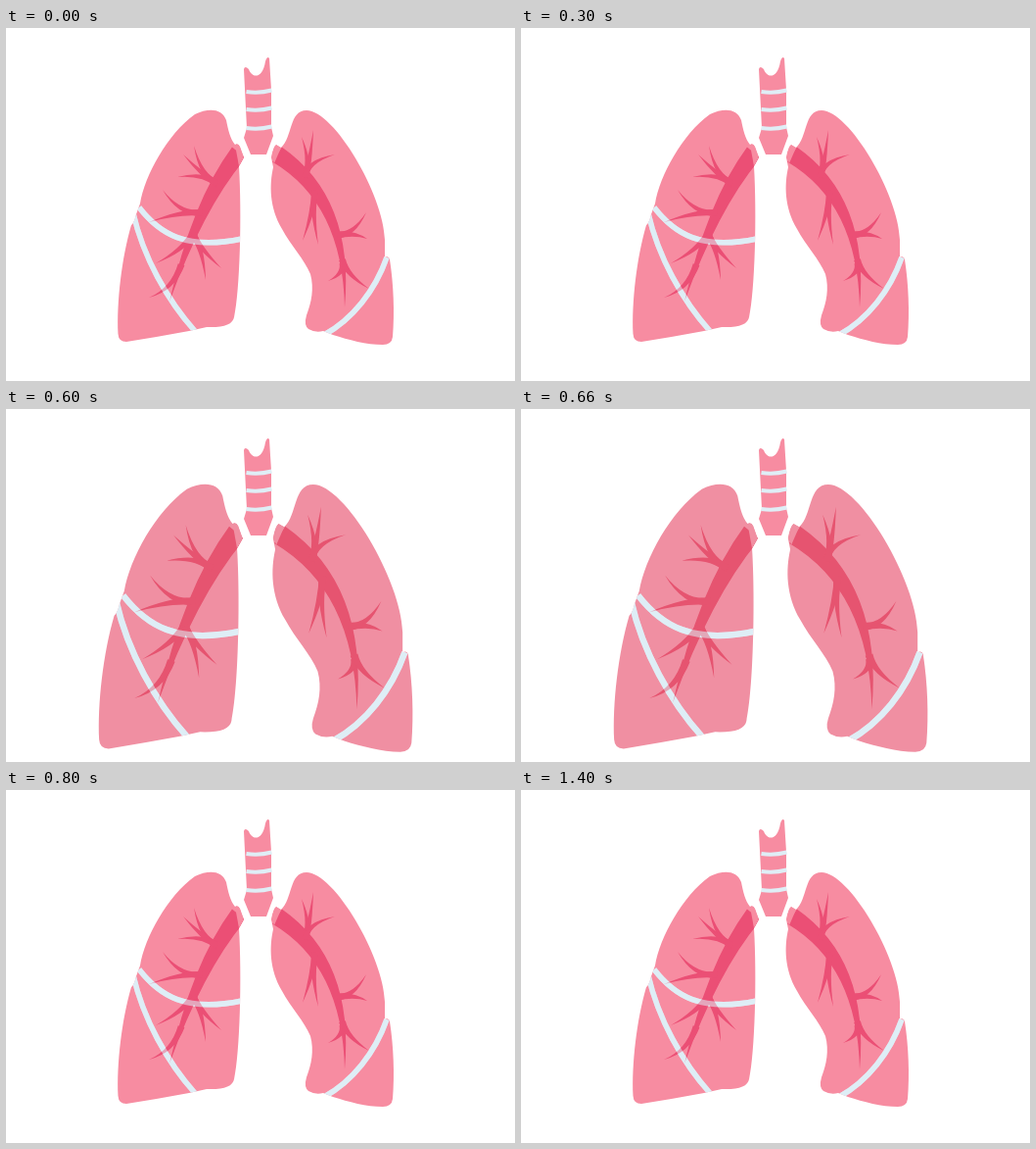
Write an HTML page with a canvas that moves like this. It is 520 px wide and 360 px high and loops after 1800 ms.

```html
<!DOCTYPE html>
<html lang="en">
<head>
<meta charset="utf-8">
<title>Breathing lungs</title>
<style>
html, body { margin: 0; width: 100%; height: 100%; overflow: hidden; background: #fff; }
canvas { display: block; }
</style>
</head>
<body>
<canvas id="stage" width="520" height="360"></canvas>
<script>
const ctx = document.getElementById('stage').getContext('2d');
const LOOP = 1800;
const BAND = '#dfeef6';
const COOL = { lobe: '#f78ca1', vessel: '#eb4f75' };
const WARM = { lobe: '#f08fa2', vessel: '#e65470' };

// grow: share of the full breath, rise: how far the lungs lift
const REST = { grow: 0, rise: 0, tone: COOL, pipe: COOL.lobe, slit: BAND };
const HALF = { grow: 0.4, rise: 6, tone: WARM, pipe: WARM.lobe, slit: '#fff' };
const FULL = { grow: 1, rise: 7, tone: WARM, pipe: COOL.lobe, slit: BAND };

const left = {
  anchor: [239, 83],
  side: -1,
  shape: new Path2D('M137 179C142 150 165 108 193 88C207 81 221 82 225 94C227 104 229 113 234 119Q237 117 239 121L243 132L238 141C241 190 239 268 233 295Q231 306 205 305L187 309Q155 315 123 320Q115 320 114.5 312C113 280 118 235 128 201Q131 199 133 190Z'),
  stub: new Path2D('M234 119Q237 117 239 121L243 132L238 141Z'),
  fissure: new Path2D('M136 183C157 210 184 227 241 215'),
  slit: new Path2D('M130 189C140 233 165 278 193 309'),
  trunk: [[238, 127], [196, 180], [167, 279]],
  // place along the trunk, fork, tips
  sprigs: [
    [0.27, [200, 149], [192, 120], [181, 129], [175, 152]],
    [0.48, [178, 188], [160, 165], [146, 198]],
    [0.62, [178, 227], [153, 240]],
    [0.62, [200, 226], [220, 245], [204, 257]],
    [0.8, [169, 265], [146, 275]]
  ]
};

const right = {
  anchor: [271, 84],
  side: 1,
  shape: new Path2D('M276 119L281 122C293 111 289 84 307 84C335 84 386 170 387 216L387 234Q391 232 392 236C396 262 397 290 395 315Q394 323 385 323C368 323 350 318 334 313L324 309Q316 311 309 307Q304 303 307 293C312 280 315 266 311 251C305 236 291 222 282 205C269 183 269 160 273 142L271 132Q273 121 276 119Z'),
  stub: new Path2D('M276 119L281 122L274 138L271 132Q273 121 276 119Z'),
  fissure: new Path2D('M389 234C377 268 354 297 325 313'),
  trunk: [[277, 129], [350, 176], [346, 285]],
  sprigs: [
    [0.22, [310, 137], [314, 104], [302, 111], [336, 129]],
    [0.32, [313, 188], [303, 217], [319, 221]],
    [0.62, [355, 209], [368, 188], [369, 215]],
    [0.78, [343, 251], [329, 258]],
    [0.76, [350, 252], [371, 266]]
  ]
};

const pipe = new Path2D('M243 42Q244 38 248 42C251 51 262 53 265 34Q267 28 269 31L271 63V101L273 110L266 129H250L243 112L246 102Z');
const ringHeights = [65, 83, 102];

function stroke(path, width, color) {
  ctx.strokeStyle = color;
  ctx.lineWidth = width;
  ctx.stroke(path);
}

function fill(path, color) {
  ctx.fillStyle = color;
  ctx.fill(path);
}

const mix = (a, b, t) => [a[0] + (b[0] - a[0]) * t, a[1] + (b[1] - a[1]) * t];
const along = ([a, b, c], t) => mix(mix(a, b, t), mix(b, c, t), t);

// A vector across the line a-b with length r.
function across(a, b, r) {
  const dx = b[0] - a[0], dy = b[1] - a[1], n = Math.hypot(dx, dy);
  return [-dy / n * r, dx / n * r];
}

// A curved vessel that narrows to a point.
function limb([a, b, c], width) {
  const [ax, ay] = across(a, b, width / 2);
  const [bx, by] = across(a, c, width * 0.38);
  ctx.beginPath();
  ctx.moveTo(a[0] + ax, a[1] + ay);
  ctx.quadraticCurveTo(b[0] + bx, b[1] + by, c[0], c[1]);
  ctx.quadraticCurveTo(b[0] - bx, b[1] - by, a[0] - ax, a[1] - ay);
  ctx.fill();
}

// Each twig leaves the trunk, heads for the fork and bends off to its tip.
function sprig(trunk, [t, fork, ...tips]) {
  const root = along(trunk, t);
  for (const tip of tips) limb([root, mix(fork, mix(root, tip, 0.5), -0.25), tip], 7);
}

function drawBands(lung, slit) {
  stroke(lung.fissure, 5.5, BAND);
  if (lung.slit) stroke(lung.slit, 5.5, slit);
}

function drawLung(lung, { grow, rise, tone, slit }) {
  const [x, y] = lung.anchor;
  const size = 1 + 0.141 * grow;
  ctx.save();
  ctx.translate(x + lung.side * 1.8 * grow, y - rise);
  ctx.scale(size, size);
  ctx.translate(-x, -y);
  fill(lung.shape, tone.lobe);
  ctx.clip(lung.shape);
  drawBands(lung, slit);
  ctx.fillStyle = tone.vessel;
  limb(lung.trunk, 18);
  for (const s of lung.sprigs) sprig(lung.trunk, s);
  fill(lung.stub, tone.lobe);
  // vessels show faintly through the fissures
  ctx.globalAlpha = 0.55;
  drawBands(lung, slit);
  ctx.restore();
}

function drawPipe(color) {
  fill(pipe, color);
  for (const y of ringHeights) stroke(new Path2D(`M245.5 ${y}q13 2 26 -1.5`), 4, BAND);
}

function poseAt(t) {
  if (t < 500 || t >= 800) return REST;
  return t >= 600 && t < 700 ? FULL : HALF;
}

function frame() {
  const pose = poseAt(performance.now() % LOOP);
  ctx.fillStyle = '#fff';
  ctx.fillRect(0, 0, 520, 360);
  drawPipe(pose.pipe);
  drawLung(left, pose);
  drawLung(right, pose);
  requestAnimationFrame(frame);
}
frame();
</script>
</body>
</html>
```
